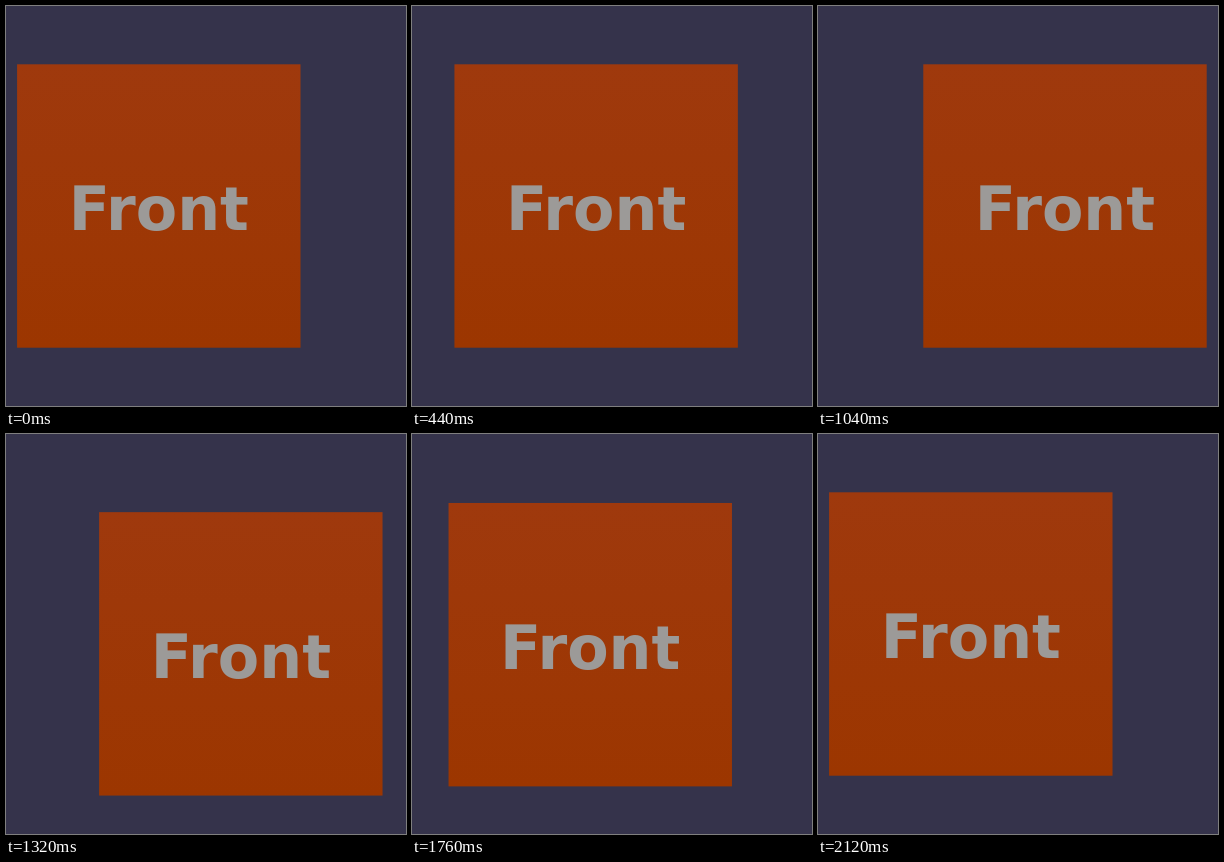
An HTML page that plays this animation: 400x400 px, repeating every 2.16 s.

```html
<!DOCTYPE html>
<html>
<head>
<meta charset="utf-8">
<style>
  html, body { margin: 0; width: 100%; height: 100%; overflow: hidden; background: #35334b; }
  svg { display: block; width: 400px; height: 400px; }
  text { font: bold 60.3px "DejaVu Sans", sans-serif; text-anchor: middle; fill: #9c9a98; }
</style>
</head>
<body>
<svg viewBox="0 0 400 400">
  <defs>
    <linearGradient id="shade" x2="0" y2="1">
      <stop offset="0" stop-color="#9f390d"/>
      <stop offset="1" stop-color="#9c3600"/>
    </linearGradient>
  </defs>
  <g id="face">
    <rect x="-141.7" y="-141.7" width="283.4" height="283.4" fill="url(#shade)"/>
    <text y="24.4">Front</text>
  </g>
</svg>
<script>
  const LOOP = 2160, START = 36, TURN = 1072, END = 2128;
  const REACH = 47.2, DIP = 86;
  const face = document.getElementById('face');
  const progress = (t, a, b) => Math.min(1, Math.max(0, (t - a) / (b - a)));

  // Straight to the right, then back along a curve that dips below.
  function place(t) {
    if (t < TURN) return [-REACH * Math.cos(Math.PI * progress(t, START, TURN)), 0];
    const s = Math.sin(Math.PI / 2 * progress(t, TURN, END));
    return [REACH * (1 - 2 * s * s), DIP * s * (1 - s)];
  }

  function draw() {
    const [x, y] = place(performance.now() % LOOP);
    face.setAttribute('transform', `translate(${200 + x} ${200 + y})`);
    requestAnimationFrame(draw);
  }
  draw();
</script>
</body>
</html>
```
